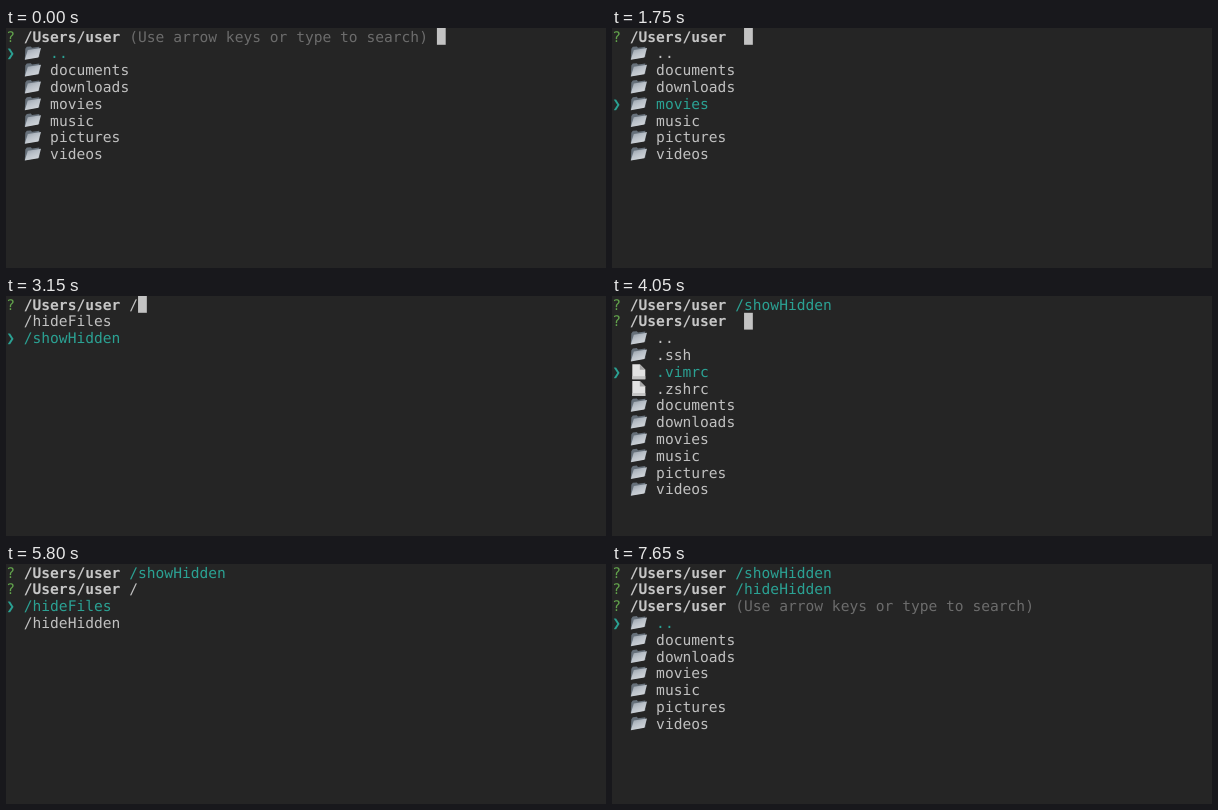
An HTML page for the animation above (7.9 s loop, 600 px wide and 240 px high).

```html
<!DOCTYPE html>
<html>
<head>
<meta charset="utf-8">
<style>
html, body { margin: 0; width: 100%; height: 100%; overflow: hidden; background: #252525; }
svg { display: block; width: 600px; height: 240px; }
text {
  font: 14.6px "DejaVu Sans Mono", monospace;
  text-rendering: geometricPrecision;
  white-space: pre;
  fill: #c0c0c0;
}
.bold { font-weight: bold; fill: #c6c6c6; }
.teal { fill: #2ba193; }
.green { fill: #62a34c; }
.dim { fill: #6c6c6c; }
</style>
</head>
<body>
<svg viewBox="0 0 600 240">
  <defs>
    <linearGradient id="silver" x1="0" y1="0" x2="0.6" y2="1">
      <stop offset="0" stop-color="#8f98a2"/>
      <stop offset="0.5" stop-color="#b9c0c8"/>
      <stop offset="1" stop-color="#d3d7db"/>
    </linearGradient>
    <g id="folder">
      <path d="M1.5 4L3 2L7 1.6L8.2 3L15.5 2L15.5 12L1 14.6Z" fill="#66707a"/>
      <path d="M4 5.2L17.2 3.2L14.6 12.6L1 15Z" fill="url(#silver)"/>
    </g>
    <g id="file">
      <path d="M2.5 1H10L15.5 6.5V16H2.5Z" fill="#e2e2e2"/>
      <path d="M10 1V6.5H15.5Z" fill="#a5a5a5"/>
      <path d="M2.5 13H15.5V16H2.5Z" fill="#c4c4c4"/>
    </g>
  </defs>
  <g id="screen"></g>
</svg>
<script>
const LOOP = 7900, CW = 8.79, RH = 16.8;
const screenEl = document.getElementById('screen');

const names = ['documents', 'downloads', 'movies', 'music', 'pictures', 'videos'];
const plain = ['..', ...names];
const hidden = ['..', '.ssh', '.vimrc', '.zshrc', ...names];
const menu = ['/hideFiles', '/showHidden'];
const menuHidden = ['/hideFiles', '/hideHidden'];
const hint = '(Use arrow keys or type to search)';
const show = ['/showHidden'], both = ['/showHidden', '/hideHidden'];

// [start ms, answered prompts, input, list, selected index]
const steps = [
  [0, [], hint, plain, 0],
  [1250, [], '', plain, 1],
  [1300, [], '', plain, 2],
  [1350, [], '', plain, 3],
  [1400, [], '', plain, 4],
  [1750, [], '', plain, 3],
  [1800, [], '', plain, 2],
  [1850, [], '', plain, 1],
  [1900, [], '', plain, 0],
  [2100, [], '/', menu, 0],
  [3050, [], '/', menu, 1],
  [3450, show, hint, hidden, 0],
  [3900, show, '', hidden, 1],
  [4000, show, '', hidden, 2],
  [4450, show, '', hidden, 1],
  [5550, show, '/', menuHidden, 0],
  [6000, show, '/', menuHidden, 1],
  [6250, both, hint, plain, 0]
];

// Spans in which the cursor is hidden
const off = [
  [250, 550], [800, 1050], [2350, 2650], [2900, 3050], [3350, 3450], [4400, 4450],
  [4750, 5000], [5250, 5450], [5800, 6000], [6600, 6850], [7100, 7350], [7600, 7900]
];

const text = (col, row, str, cls = '') =>
  `<text x="${col * CW + 0.15}" y="${row * RH + 13.6}" class="${cls}">${str}</text>`;

const prompt = (row, input, cls) =>
  text(0, row, '?', 'green') + text(2, row, '/Users/user', 'bold') + text(14, row, input, cls);

function item(row, name, selected) {
  const cls = selected ? 'teal' : '';
  const arrow = selected ? text(0, row, '❯', cls) : '';
  if (name[0] === '/') return arrow + text(2, row, name, cls);
  const icon = name.endsWith('rc') ? 'file' : 'folder';
  return arrow + `<use href="#${icon}" x="17.8" y="${row * RH}"/>` + text(5, row, name, cls);
}

function draw([, done, input, list, sel], cursor) {
  const row = done.length;
  let out = done.map((answer, i) => prompt(i, answer, 'teal')).join('');
  out += prompt(row, input, input === hint ? 'dim' : '');
  out += list.map((name, i) => item(row + 1 + i, name, i === sel)).join('');
  if (cursor) {
    const col = input === hint ? 49 : 15;
    out += `<rect x="${col * CW + 0.2}" y="${row * RH}" width="${CW}" height="${RH}" fill="#c3c3c3"/>`;
  }
  screenEl.innerHTML = out;
}

let last = '';
function frame() {
  const t = performance.now() % LOOP;
  const index = steps.findLastIndex(s => s[0] <= t);
  const cursor = !off.some(([a, b]) => t >= a && t < b);
  const key = index + '/' + cursor;
  if (key !== last) draw(steps[index], cursor);
  last = key;
  requestAnimationFrame(frame);
}
frame();
</script>
</body>
</html>
```
